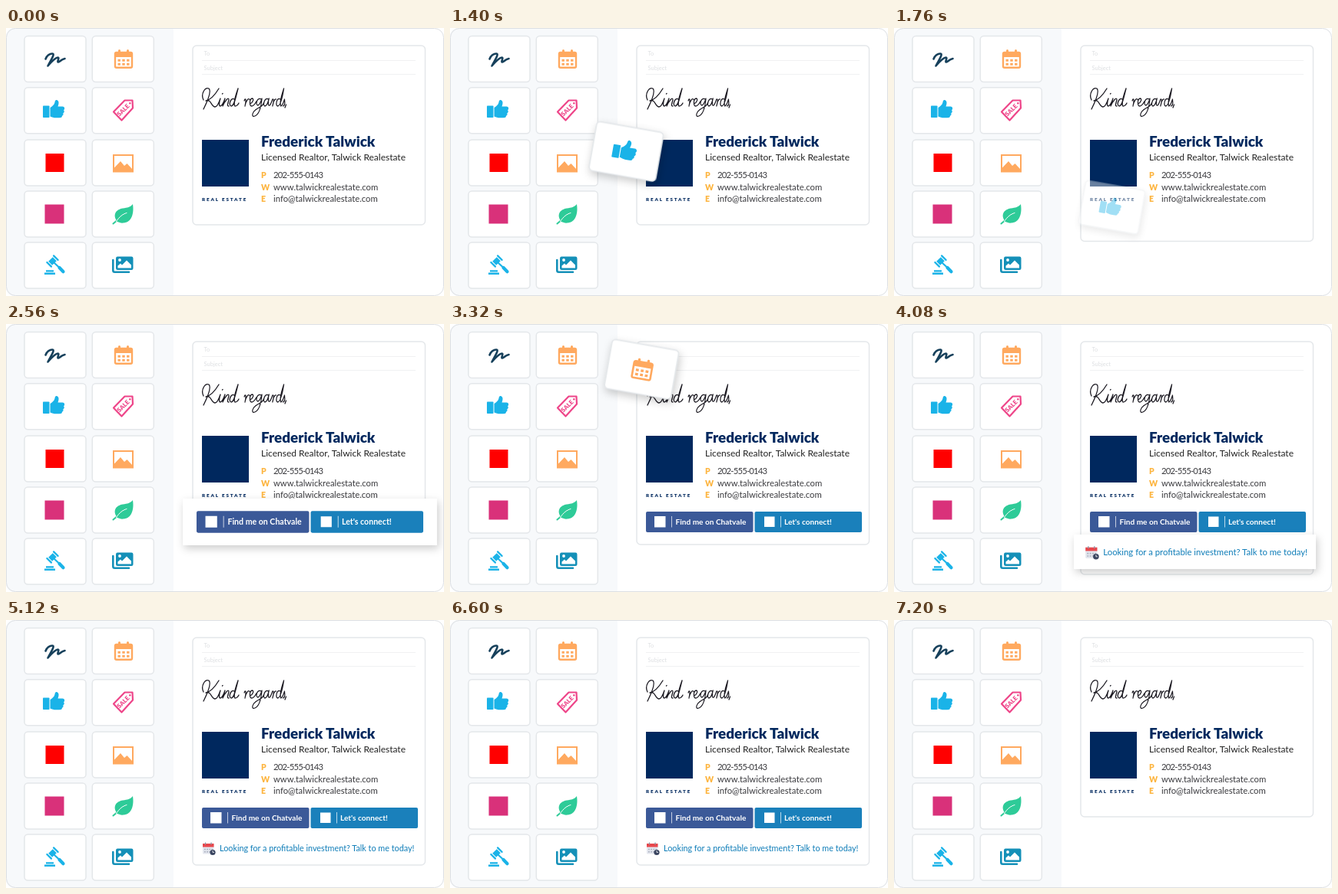
Recreate the animation shown at these times as an HTML page. Size 570x350 px, loop 8000 ms.

```html
<!DOCTYPE html>
<html lang="en">
<head>
<meta charset="utf-8">
<title>Email signature builder</title>
<style>
  html, body { margin: 0; width: 100%; height: 100%; overflow: hidden; background: #fff; }
  svg { display: block; width: 570px; height: 350px; font-family: Lato, sans-serif; }
  .card { fill: #fff; stroke: #e4e7ea; stroke-width: 1.5; }
  .lift { filter: drop-shadow(2px 4px 5px rgba(0, 0, 0, .2)); }
  .line { fill: none; stroke-linecap: round; stroke-linejoin: round; }
  .b { font-weight: 700; }
  .xb { font-weight: 900; }
</style>
</head>
<body>
<svg viewBox="0 0 570 350">
  <defs>
    <g id="calendar">
      <rect x="-11" y="-8.5" width="22" height="19.8" rx="1.8" fill="none" stroke="#ffa95f" stroke-width="2.4"/>
      <path fill="#ffa95f" d="M-11-8.5h22v6h-22z"/>
      <path class="line" stroke="#ffa95f" stroke-width="3" d="M-5.5-11v3M5.500-11v3"/>
      <path stroke="#ffa95f" stroke-width="3" stroke-dasharray="3.4 2.4" d="M-7.500 1.700h15M-7.500 6.700h15"/>
    </g>
    <g id="thumb" fill="#1ab3e8">
      <rect x="-14" y="-4.500" width="8.500" height="15.500" rx=".8"/>
      <path d="M-4.500-2C-2-3.500 1-6 1.500-9C2-12 3-12.500 5-11.500C7.500-10 6.500-6 5.500-3.500H11.500C14.500-3.500 15 0 13 1.200C14.300 2.500 14 4.500 12.300 5.300C13 7 12.300 8.300 11 8.800C11 10.500 10 11.300 7.500 11.300H3C0 11.300-2 10.500-4.500 9.500z"/>
    </g>
  </defs>

  <path fill="#f7f9fb" d="M12 0H218V350H12Q0 350 0 338V12Q0 0 12 0z"/>
  <g id="slots"></g>

  <!-- tool icons -->
  <path class="line" stroke="#16405b" stroke-width="2.600" d="M51.500 40.500C53 36 57 33.500 60 33.500C64 33.500 60 39 54.500 49.500C60 43 65 38.500 67.500 38.500C70 38.500 66 44.500 68 44.500C70.500 44.500 71 41 76.500 40"/>
  <use href="#calendar" x="153" y="40.500"/>
  <use href="#thumb" x="62" y="106"/>
  <path class="line" stroke="#ee4589" stroke-width="2.200" d="M154.500 94.500L164.500 94.500L165 104.500L150.500 120.500L140 109.500z"/>
  <circle cx="161.300" cy="98.200" r="1.200" fill="#ee4589"/>
  <text class="xb" transform="translate(154.500 109.200) rotate(-45)" text-anchor="middle" font-size="8" fill="#ee4589">SALE</text>
  <rect x="51.500" y="164" width="24" height="24" fill="#f00"/>
  <rect x="140" y="166" width="25" height="21.500" fill="none" stroke="#ffa95f" stroke-width="2"/>
  <path fill="#ffa95f" d="M140 187V183.500L149 174L154 180L157.500 177L165 185V187z"/>
  <rect x="50.500" y="230.500" width="25" height="25" fill="#d9317a"/>
  <g fill="#2ecb98">
    <path d="M165 230C167 243 163 254 153 254.500C150 255 147 254 145 253C138 244 143 237 152 235.500C158 234.500 162 234 165 230z"/>
    <path class="line" stroke="#2ecb98" stroke-width="2" d="M139.500 255.500L146 250"/>
    <path class="line" stroke="#fff" stroke-width="1" d="M143.500 252.500C148 246 152 243 157 241.500"/>
  </g>
  <g fill="#1ab3e8">
    <g transform="translate(60.500 304.500) rotate(-45)">
      <rect x="-4" y="-3.500" width="8" height="7"/>
      <rect x="-7.300" y="-5" width="2.300" height="10" rx="1"/>
      <rect x="5" y="-5" width="2.300" height="10" rx="1"/>
    </g>
    <path stroke="#1ab3e8" stroke-width="2.200" d="M62 306L69 312.500"/>
    <path class="line" stroke="#1ab3e8" stroke-width="4.200" d="M69.500 313L74.500 318.300"/>
    <path d="M50 319.500h14v2.500h-14zM52 316.300h10v2.200h-10z"/>
  </g>
  <g fill="#1490b8">
    <path class="line" stroke="#1490b8" stroke-width="2.600" d="M139.300 303V316.500Q139.300 318.700 141.500 318.700H160"/>
    <rect x="143" y="298.500" width="22.500" height="17.500" rx="2.200"/>
    <circle cx="148" cy="303" r="1.900" fill="#fff"/>
    <path fill="#fff" d="M145.500 313.500V310.500L149 307.500L151 309.500L157 303.500L163 309.500V313.500z"/>
  </g>

  <!-- message panel -->
  <rect id="panel" class="card" x="243" y="23" width="302.500" height="234" rx="5"/>
  <path stroke="#f0f1f2" d="M255 42.500H533M255 60.500H533"/>
  <g font-size="7.500" fill="#dddfe2"><text x="257.500" y="36">To</text><text x="257.500" y="54.500">Subject</text></g>
  <g class="line" stroke="#1c1a22" stroke-width="1.300">
    <path d="M257 94C253 86 259 77 264 79C268 83 262 96 257 106M277 79C271 89 265 94 260 95C267 92 267 103 272 103C275 103 277 98 279 92C277 98 277 102 279 102C282 101 284 95 285 92L282 102C285 95 290 89 290 94C289 98 287 102 290 102M281.500 86l.5-.5M297 93C293 90 289 100 293 102C297 102 299 91 302 79C298 90 296 100 298 102C300 102 302 100 303 98"/>
    <path transform="translate(27.600 -2) scale(.92 1)" d="M307 97C309 92 310 96 308 104C309 98 313 92 315 96M315 101C320 99 321 94 318 94C314 95 314 104 318 104C321 103 323 100 324 98M331 95C326 92 322 101 326 103C329 103 331 97 332 94C331 104 328 115 322 117C317 119 317 112 326 107C331 105 334 102 335 99M341 95C336 92 333 102 336 104C339 104 341 98 342 94C340 101 341 104 343 103C345 101 346 98 347 95C349 94 349 98 347 104C348 99 350 94 352 95M358 95C353 92 351 102 354 104C358 104 361 93 363 81C359 92 357 102 359 104C361 103 363 98 364 95C364 99 366 102 362 104"/>
    <path d="M364.500 100L363 104"/>
  </g>
  <rect x="255" y="146" width="61" height="61" fill="#00285e"/>
  <text class="xb" x="255" y="226" font-size="6.300" letter-spacing="1.850" fill="#00285e">REAL ESTATE</text>
  <text class="xb" x="332" y="155" font-size="18.900" fill="#00285e">Frederick Talwick</text>
  <text x="332" y="172.500" font-size="12" fill="#222">Licensed Realtor, Talwick Realestate</text>
  <g class="xb" font-size="10.500" fill="#fdb540">
    <text x="332" y="195.500">P</text><text x="332" y="211.500">W</text><text x="332" y="227">E</text>
  </g>
  <g font-size="11.300" fill="#3a3a3e">
    <text x="348" y="195.500" letter-spacing="-.8">202-555-0143</text>
    <text x="348" y="211.500">www.talwickrealestate.com</text>
    <text x="348" y="227">info@talwickrealestate.com</text>
  </g>

  <!-- add-ons -->
  <g id="social">
    <rect class="lift" x="238" y="229.500" width="315" height="58" fill="#fff"/>
    <rect x="255" y="245" width="139.500" height="27" rx="2" fill="#3b5998"/>
    <rect x="396.500" y="245" width="139.500" height="27" rx="2" fill="#1a80bb"/>
    <path fill="#fff" d="M266 251h14.500v14.500h-14.500zM409 251.500h13.500v13.500h-13.500z"/>
    <path stroke="#fff" stroke-opacity=".7" d="M288.500 251V265.500M430.500 251V265.500"/>
    <g class="b" font-size="10.100" fill="#fff">
      <text x="293.500" y="261.800">Find me on Chatvale</text><text x="435" y="261.800">Let's connect!</text>
    </g>
  </g>
  <g id="invite">
    <rect class="lift" x="241.500" y="276" width="300" height="43" fill="#fff"/>
    <rect x="256" y="292" width="14.500" height="13.500" rx="1" fill="#e3e6ee"/>
    <path fill="#e8474c" d="M256 292h14.500v4.500h-14.500z"/>
    <path stroke="#8d94a6" stroke-width="1.300" d="M259.500 290.500v3M267 290.500v3"/>
    <path stroke="#a9afbd" stroke-width="1.500" stroke-dasharray="1.800 1.400" d="M258 299.500h11M258 302.800h8"/>
    <circle cx="269" cy="303.500" r="3.600" fill="#3a4560"/>
    <path class="line" stroke="#fff" stroke-width=".8" d="M269 301.500v2h1.500"/>
    <text x="278" y="302" font-size="10.800" fill="#0f7db8">Looking for a profitable investment? Talk to me today!</text>
  </g>

  <!-- dragged cards -->
  <g id="dragThumb"><rect class="card lift" x="-40" y="-29.500" width="80" height="59" rx="4.500"/><use href="#thumb" x="-2" y="-1.500"/></g>
  <g id="dragCal"><rect class="card lift" x="-40" y="-29.500" width="80" height="59" rx="4.500"/><use href="#calendar" x="1"/></g>

  <rect x=".5" y=".5" width="569" height="349" rx="12" fill="none" stroke="#dcdfe3"/>
</svg>
<script>
const $ = id => document.getElementById(id);
const seg = (t, a, b) => Math.min(1, Math.max(0, (t - a) / (b - a)));
const easeOut = p => 1 - (1 - p) ** 2;
const smooth = p => p * p * (3 - 2 * p);

$("slots").innerHTML = [10.5, 77.8, 146, 213, 280].map(y => [24, 112.3].map(x =>
  `<rect class="card" x="${x}" y="${y}" width="80" height="60" rx="4.5"/>`).join("")).join("");

// Moves a card from its slot along a falling arc, then drops it.
function drag(id, t, start, length, x, y, dx, dy, bend) {
  const p = seg(t, start, start + length);
  const grip = seg(t, start, start + 80), drop = seg(p, .88, 1);
  const el = $(id);
  el.style.display = p > 0 && p < 1 ? "" : "none";
  el.setAttribute("opacity", 1 - drop);
  el.setAttribute("transform", `translate(${x + dx * easeOut(p)} ${y + dy * p ** bend})
    rotate(${10 * grip}) scale(${1 + .1 * grip - .2 * drop})`);
}

// Shows an add-on raised, then lowers it into the panel.
function addOn(id, t, show, shown, settle, cx, cy) {
  const seen = seg(t, show, shown);
  const raised = seen * (1 - smooth(seg(t, settle, settle + 200)));
  const el = $(id);
  el.setAttribute("opacity", seen * (1 - seg(t, 6600, 7200)));
  el.setAttribute("transform", `translate(${cx} ${cy}) scale(${1 + .05 * raised}) translate(${-cx} ${-cy})`);
  el.firstElementChild.setAttribute("opacity", raised);
}

function draw(t) {
  const height = 234 + 31 * easeOut(seg(t, 1600, 1960)) + 39 * easeOut(seg(t, 3680, 4000))
    - 7 * smooth(seg(t, 4920, 5120)) - 63 * smooth(seg(t, 6600, 7200));
  $("panel").setAttribute("height", height);
  addOn("social", t, 1840, 1960, 2760, 395.5, 258.5);
  addOn("invite", t, 3920, 4080, 4920, 391.5, 297.5);
  drag("dragThumb", t, 1000, 800, 64, 108, 220, 135, 1.35);
  drag("dragCal", t, 3040, 640, 152, 40, 142, 245, 3.1);
}

const begin = performance.now();
function tick() {
  draw((performance.now() - begin) % 8000);
  requestAnimationFrame(tick);
}
tick();
</script>
</body>
</html>
```
